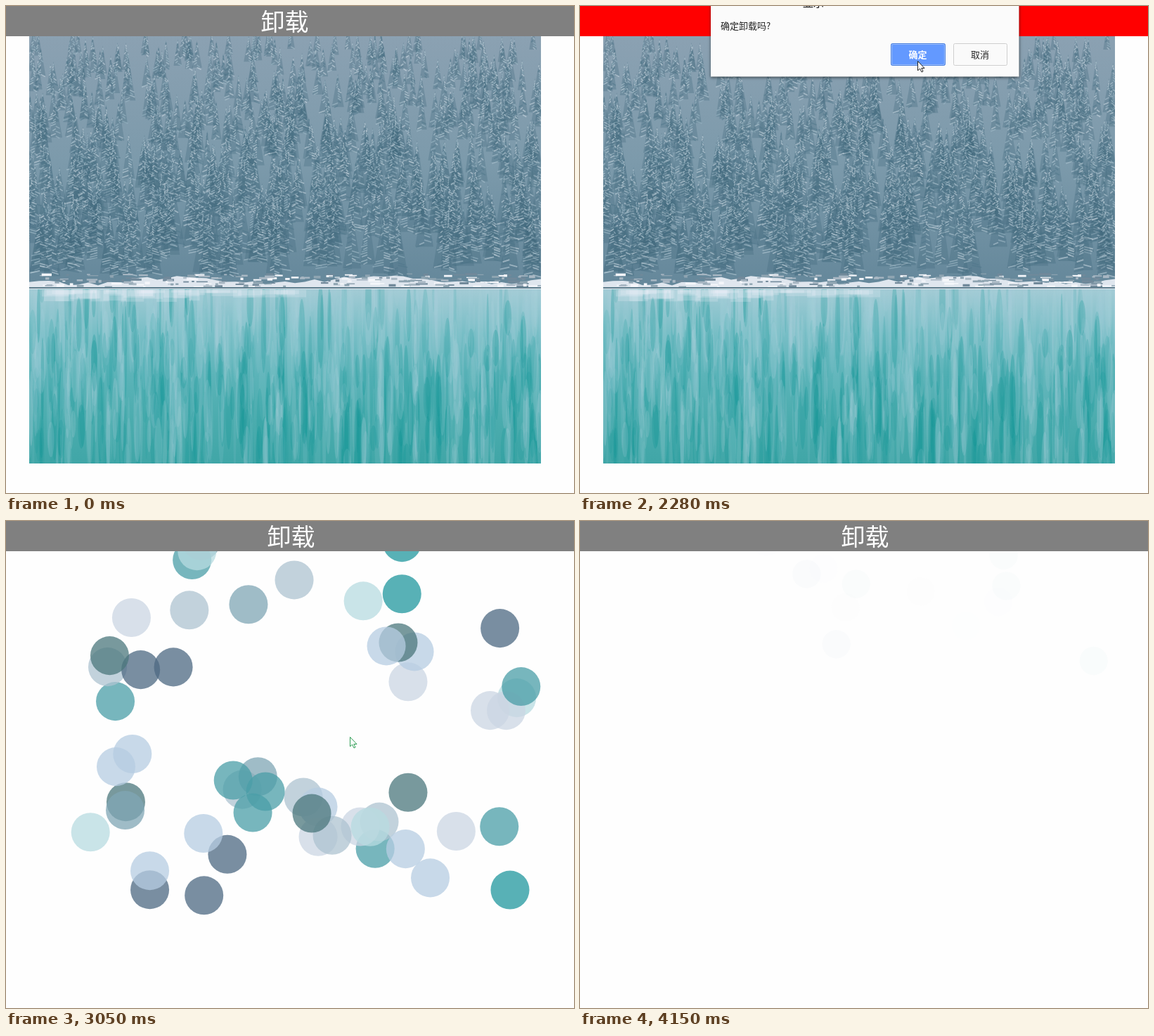
An HTML page with a canvas for the animation above (4.77 s loop, 808x693 px).

```html
<!DOCTYPE html>
<html lang="zh">
<head>
<meta charset="utf-8">
<style>
html, body { margin: 0; width: 100%; height: 100%; overflow: hidden; background: #fefefe; }
canvas { display: block; }
</style>
</head>
<body>
<canvas id="stage" width="808" height="693"></canvas>
<script>
const LOOP = 4770, HOVER = 1270, ASK = 1740, SHAKE = 2350, BURST = 2680, MID = 3050, END = 4150;
const FONT = '"Noto Sans CJK SC", "Noto Sans CJK", sans-serif';
const ctx = document.getElementById('stage').getContext('2d');

function seeded(seed) {
  return () => {
    seed = seed + 0x6D2B79F5 | 0;
    let r = Math.imul(seed ^ seed >>> 15, 1 | seed);
    r = r + Math.imul(r ^ r >>> 7, 61 | r) ^ r;
    return ((r ^ r >>> 14) >>> 0) / 4294967296;
  };
}
const clamp = v => Math.max(0, Math.min(1, v));

// Snowy forest above a turquoise lake, 728 x 608
function paintScene() {
  const W = 728, H = 608, SHORE = 360;
  const cv = Object.assign(document.createElement('canvas'), { width: W, height: H });
  const c = cv.getContext('2d');
  const rnd = seeded(11);
  const pick = list => list[Math.floor(rnd() * list.length)];
  const fade = (y0, y1, stops) => {
    const g = c.createLinearGradient(0, y0, 0, y1);
    stops.forEach((s, i) => g.addColorStop(i / (stops.length - 1), s));
    c.fillStyle = g;
    c.fillRect(0, y0, W, y1 - y0);
  };

  fade(0, SHORE, ['#8ba1b2', '#7c9aab', '#64879a']);
  c.lineWidth = 1.6;
  for (let i = 0; i < 620; i++) {
    const p = i / 620, base = 18 + p * 325, size = 34 + p * 52;
    const x = rnd() * W, half = size * (.13 + rnd() * .06);
    c.globalAlpha = .3;
    c.fillStyle = '#3f667b';
    c.beginPath();
    c.moveTo(x, base - size);
    c.lineTo(x + half, base);
    c.lineTo(x - half, base);
    c.fill();
    c.globalAlpha = .5;
    for (let y = 3; y < size; y += 3.5) {
      const w = half * y / size * (.5 + rnd() * .7);
      const side = rnd() < .5 ? -1 : 1;
      c.strokeStyle = pick(['#c6d8e2', '#b3cad6', '#a1bdcb', '#dce6ee', '#4d7589']);
      c.beginPath();
      c.moveTo(x, base - size + y);
      c.lineTo(x + side * w, base - size + y + 3);
      c.stroke();
    }
  }

  // snowy bank
  c.globalAlpha = 1;
  c.fillStyle = '#dfe6ee';
  c.beginPath();
  c.moveTo(0, SHORE);
  for (let x = 0; x <= W; x += 14) c.lineTo(x, 344 + 5 * Math.sin(x / 45) + rnd() * 7);
  c.lineTo(W, SHORE);
  c.fill();
  for (let i = 0; i < 190; i++) {
    c.fillStyle = pick(['#71899a', '#8ea4b1', '#f4f6fa', '#a8b7c3']);
    c.fillRect(rnd() * W, 337 + rnd() * 19, 3 + rnd() * 14, 1 + rnd() * 3);
  }
  c.fillStyle = '#61808f';
  c.fillRect(0, 357, W, 2);

  // reflections
  fade(SHORE, H, ['#a3cbd5', '#78bec6', '#5bb3b8', '#4bacae', '#40a6a7']);
  for (let i = 0; i < 850; i++) {
    const p = rnd(), x = rnd() * W;
    const dark = rnd() < .2 + p * .45;
    c.globalAlpha = .1 + rnd() * .18;
    c.fillStyle = dark ? '#0c9292' : '#a6cdd8';
    c.beginPath();
    c.ellipse(x, SHORE + p * 248, 1.5 + rnd() * 4, 18 + rnd() * 52, 0, 0, 7);
    c.save();
    c.clip();
    c.fillRect(0, SHORE, W, H - SHORE);
    c.restore();
  }
  c.fillStyle = '#f0f2f8';
  for (let i = 0; i < 40; i++) {
    c.globalAlpha = .22;
    c.fillRect(rnd() * 390, SHORE + 1, 15 + rnd() * 30, 3 + rnd() * 14);
  }
  return cv;
}

// Places of the discs when the burst has opened, by colour
const CLOUD = {
  '#4d6a83': [702,153, 192,212, 238,208, 315,475, 205,525, 282,533],
  '#4b9ea8': [265,56, 156,257, 732,236, 369,386, 351,416, 323,370, 525,467, 701,435],
  '#4c787d': [558,173, 148,192, 171,400, 435,417, 572,387],
  '#22989f': [563,31, 563,104, 716,525],
  '#ccd6e3': [179,138, 572,229, 688,270, 711,270, 444,450, 504,436, 640,442],
  '#b7cde2': [541,178, 581,186, 157,350, 180,332, 281,445, 205,498, 444,408, 568,467, 603,508],
  '#b8dbe1': [272,43, 508,114, 726,252, 121,443, 518,436],
  '#afc3d1': [410,84, 261,127, 145,208, 336,383, 423,394, 464,448, 531,429],
  '#80a6b5': [278,29, 345,119, 170,412, 358,365]
};
const CX = 413, CY = 356;

function makeDiscs() {
  const rnd = seeded(5), discs = [];
  const add = (color, x, y) => {
    const a = Math.atan2((y - 285) * 1.2, x - 418);
    const reach = (.72 + rnd() * .28) / .308;
    discs.push({
      color, x, y, order: rnd(),
      qx: CX + Math.cos(a) * 67 * reach,
      qy: CY + Math.sin(a) * 90 * reach,
      dx: (rnd() - .5) * 90 + (418 - x) * .06,
      dy: -110 - rnd() * 190
    });
  };
  const colors = Object.keys(CLOUD);
  for (const color of colors) {
    const pts = CLOUD[color];
    for (let i = 0; i < pts.length; i += 2) add(color, pts[i], pts[i + 1]);
  }
  for (let i = 0; i < 14; i++) add(colors[i % 9], 250 + i * 25, -30 - rnd() * 120);
  return discs.sort((a, b) => a.order - b.order);
}

// A curve out from the centre, then a bend into the upward drift
function discAt(t, p, q, d, from) {
  if (t < MID) {
    const u = (t - BURST) / (MID - BURST);
    return from * (1 - u) ** 2 + 2 * u * (1 - u) * q + u * u * p;
  }
  const s = (t - MID) / 460, e = Math.min(s, 1);
  return p + d * s + (2.48 * (p - q) - d) * e * (1 - e) ** 2;
}

function drawDiscs(t) {
  const k = clamp((t - BURST) / 1500);
  for (const o of discs) {
    ctx.globalAlpha = 1 - k;
    ctx.fillStyle = o.color;
    ctx.beginPath();
    ctx.arc(discAt(t, o.x, o.qx, o.dx, CX), discAt(t, o.y, o.qy, o.dy, CY), 30 - 10 * k, 0, 7);
    ctx.fill();
  }
  ctx.globalAlpha = 1;
}

function text(str, x, y, size, color, align = 'center', weight = 400) {
  ctx.font = `${weight} ${size}px ${FONT}`;
  ctx.fillStyle = color;
  ctx.textAlign = align;
  ctx.fillText(str, x, y);
}

function box(x, y, w, h, fill, line) {
  ctx.fillStyle = fill;
  ctx.strokeStyle = line;
  ctx.lineWidth = 1;
  ctx.beginPath();
  ctx.roundRect(x + .5, y + .5, w, h, 2);
  ctx.fill();
  ctx.stroke();
}

function drawDialog() {
  ctx.save();
  ctx.shadowColor = 'rgba(0,0,0,.55)';
  ctx.shadowBlur = 4;
  ctx.shadowOffsetY = 1;
  ctx.fillStyle = '#fbfbfb';
  ctx.fillRect(186, -40, 438.5, 140.5);
  ctx.restore();
  text('显示', 317, 1, 15, '#111', 'left');
  text('确定卸载吗?', 200, 33, 13, '#222', 'left');
  box(442, 53, 77, 31, '#6399ff', '#4a80dc');
  box(443, 54, 75, 29, '#6399ff', '#9dbfff');
  text('确定', 480.5, 74, 13, '#fff', 'center', 700);
  box(531, 53, 76, 31, '#fafafa', '#cfcfcf');
  text('取消', 569, 74, 13, '#222');
}

// time, x, y of the pointer tip
const POINTER = [
  [70, 654, 578], [310, 505, 260], [570, 400, 79], [640, 399, 50], [800, 398, 71],
  [950, 398, 71], [1030, 397, 34], [1110, 397, 55], [1190, 397, 55], [1270, 398, 38],
  [1350, 399, 18], [1650, 399, 18], [1740, 405, 60], [1890, 440, 150], [2130, 478, 85],
  [2200, 480, 78], [2360, 480, 78], [2750, 486, 271], [2990, 489, 307], [3830, 489, 307],
  [4150, 495, 700]
];
const ARROW = new Path2D('M.5.5V14L3.5 11 6 16 8 15 5.8 10.5H10Z');

function drawPointer(t) {
  const i = POINTER.findIndex(k => k[0] > t);
  if (i < 1) return;
  const [t0, x0, y0] = POINTER[i - 1], [t1, x1, y1] = POINTER[i];
  const u = (t - t0) / (t1 - t0);
  ctx.save();
  ctx.translate(x0 + (x1 - x0) * u, y0 + (y1 - y0) * u);
  ctx.fillStyle = '#fff';
  ctx.strokeStyle = t < 2700 ? '#222' : t < 2990 ? '#4d6a83' : '#2f9d55';
  ctx.lineWidth = 1;
  ctx.fill(ARROW);
  ctx.stroke(ARROW);
  ctx.restore();
}

const scene = paintScene(), discs = makeDiscs();

function draw(now) {
  const t = now % LOOP, removed = t >= SHAKE;
  ctx.fillStyle = '#fefefe';
  ctx.fillRect(0, 0, 808, 693);

  if (!removed) {
    ctx.drawImage(scene, 33, 43);
  } else if (t < BURST) {
    ctx.save();
    ctx.translate(406, 346);
    ctx.rotate(5 * Math.PI / 180 * Math.sin((t - 2360) / 287 * 2 * Math.PI));
    ctx.drawImage(scene, -364, -304);
    ctx.restore();
  } else {
    drawDiscs(Math.min(t, END));
  }

  ctx.fillStyle = t >= HOVER && !removed ? '#f00' : '#808080';
  ctx.fillRect(0, 0, 808, 43);
  text('卸载', removed ? 405.5 : 396.5, 35, 34, '#fff');
  if (t >= ASK && !removed) drawDialog();
  drawPointer(t);
}

const start = performance.now();
function tick() {
  draw(performance.now() - start);
  requestAnimationFrame(tick);
}
tick();
</script>
</body>
</html>
```
